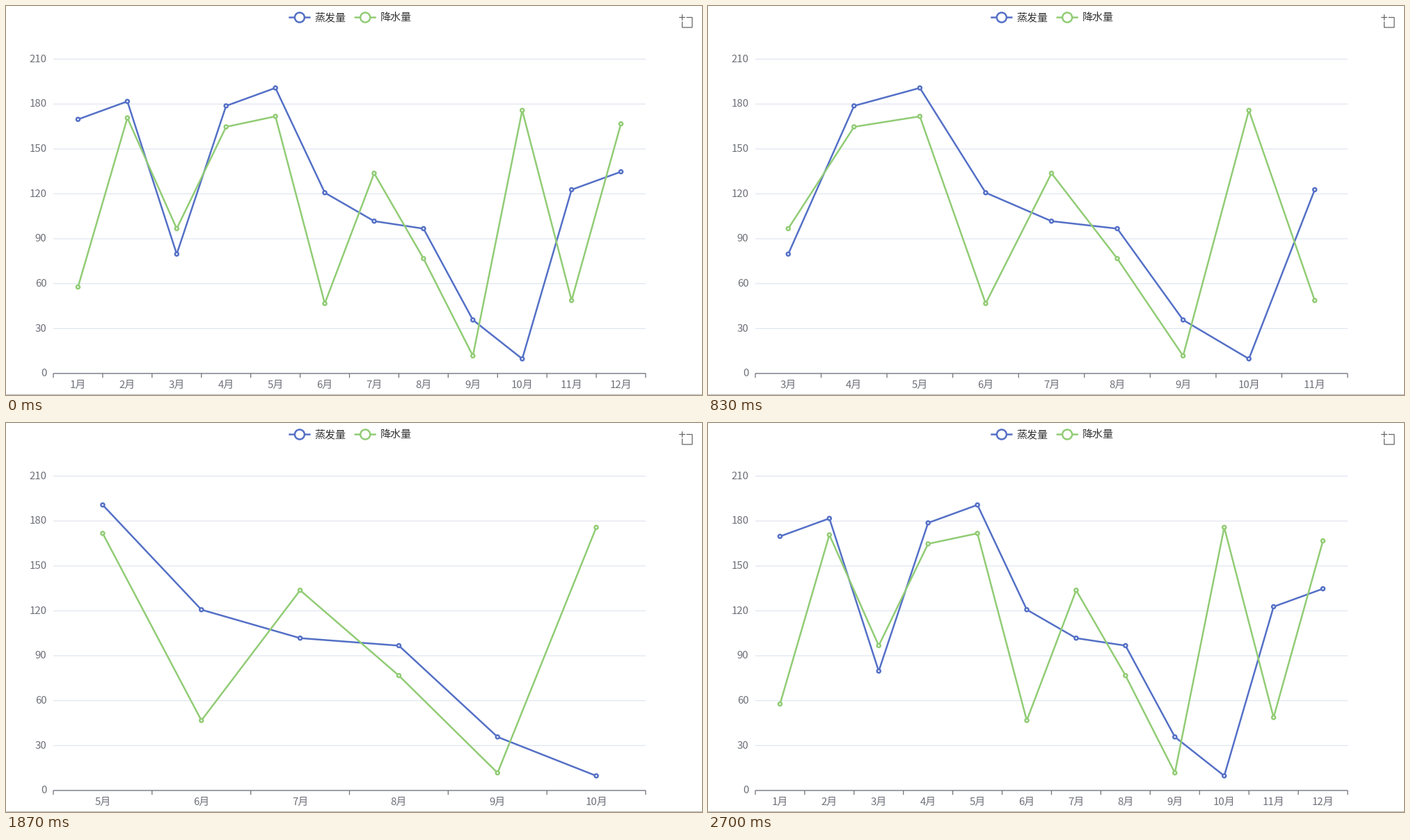
Animation of 1000x560 px, one loop 2950 ms. Source, as a matplotlib script:

```python
import math

import matplotlib.pyplot as plt
from matplotlib.animation import FuncAnimation
from matplotlib.collections import LineCollection, PatchCollection
from matplotlib.patches import Circle, Rectangle

W, H, DPI = 1000, 560, 100
LOOP, INTERVAL = 2950, 25
PX = 72 / DPI                      # points per pixel
LEFT, RIGHT, TOP, BOTTOM = 68, 919, 77, 529.5
HAIR = 0.5                         # grid lines sit half a pixel above values
LEGEND_Y = 16.5
STEP = 30
AXIS, GRID, INK = "#6E7079", "#E0E6F1", "#333333"
FONT = dict(family="Noto Sans CJK JP", size=15 * PX)

SERIES = [
    ("蒸发量", "#5470C6", 406.3,
     [170, 182, 80, 179, 191, 121, 102, 97, 36, 10, 123, 135]),
    ("降水量", "#91CC75", 500.6,
     [58, 171, 97, 165, 172, 47, 134, 77, 12, 176, 49, 167]),
]
MONTHS = 12

# Mouse wheel: NOTCHES in, then the same number out, around the pointer
NOTCHES, ZOOM, POINTER = 12, 1.1, 0.62
IN_START, IN_GAP = 360, 95
OUT_END, OUT_GAP = 2468, 76
GLIDE_MS = 100

# The picture is refreshed every 100 ms, counted anew from these moments
REFRESH_MS, CLOCKS = 100, (0, 150, 580, 850, 1330, 1770, 2200)


def cubic_out(t):
    return 1 - (1 - min(max(t, 0), 1)) ** 3


def lerp(a, b, k):
    return a + (b - a) * k


class View:
    """Pixel coordinates for the months visible after some wheel notches."""

    def __init__(self, notches):
        end = MONTHS - 1
        cut = end * (1 - ZOOM ** -notches)
        self.first = round(cut * POINTER)
        self.last = round(end - cut * (1 - POINTER))
        self.band = (RIGHT - LEFT) / (self.last - self.first + 1)
        peak = max(max(s[3][self.first:self.last + 1]) for s in SERIES)
        self.top = math.ceil(peak / STEP) * STEP

    def has(self, month):
        return self.first <= month <= self.last

    def edge(self, month):
        return LEFT + (month - self.first) * self.band

    def x(self, month):
        return self.edge(month + 0.5)

    def y(self, value):
        return BOTTOM - (BOTTOM - TOP) * value / self.top


VIEWS = [View(n) for n in range(NOTCHES + 1)]


def transition(now):
    """Views before and after the latest wheel notch, and the progress."""
    left = max(math.ceil((OUT_END - now) / OUT_GAP), 0)
    if left < NOTCHES:
        start = OUT_END - left * OUT_GAP
        old = left + 1
    else:
        left = min(max((now - IN_START) // IN_GAP, 0), NOTCHES)
        start = IN_START + left * IN_GAP
        old = max(left - 1, 0)
    return VIEWS[old], VIEWS[left], cubic_out((now - start) / GLIDE_MS)


fig = plt.figure(figsize=(W / DPI, H / DPI), dpi=DPI, facecolor="white")
ax = fig.add_axes([0, 0, 1, 1])
ax.set_xlim(0, W)
ax.set_ylim(H, 0)
ax.axis("off")


def stroke(xs, ys, color, width, z=2, **kw):
    return ax.plot(xs, ys, color=color, lw=width * PX, zorder=z,
                   solid_capstyle="butt", **kw)[0]


def ring_style(color, z):
    return dict(facecolor="white", edgecolor=color, linewidth=2.5 * PX,
                zorder=z)


def segments(color, z):
    lines = LineCollection([], colors=color, linewidths=1.25 * PX, zorder=z)
    lines.set_snap(False)
    return ax.add_collection(lines, autolim=False)


def label(x, y, text, color, align):
    return ax.text(x, y, text, color=color, ha=align, va="baseline",
                   zorder=6, **FONT)


# Window border, legend and toolbox icon
stroke([999.5, 999.5], [0, H], "#C8C8C8", 1)
stroke([0, W], [559.3, 559.3], "#C0C0C0", 1.4)
for name, color, x, _ in SERIES:
    stroke([x, x + 31.25], [LEGEND_Y, LEGEND_Y], color, 2.5, snap=False)
    ax.add_patch(Circle((x + 15.6, LEGEND_Y), 7, **ring_style(color, 3)))
    label(x + 37, LEGEND_Y + 4.8, name, INK, "left")

UNIT = 18.75 / 58
for path in ([(0, 13.5), (26.9, 13.5)], [(13.5, 0), (13.5, 26.9)],
             [(32.1, 13.5), (58, 13.5), (58, 58), (13.5, 58), (13.5, 32.1)]):
    stroke([967.2 + UNIT * px for px, _ in path],
           [12.1 + UNIT * py for _, py in path], "#666666", 1.25,
           snap=False, solid_joinstyle="miter")

# Axes and series
stroke([LEFT, RIGHT], [BOTTOM - HAIR] * 2, AXIS, 1.25, z=1.5, snap=False)
grid = segments(GRID, 1)
ticks = segments(AXIS, 1.5)
months = [label(0, 550.3, f"{m + 1}月", AXIS, "center")
          for m in range(MONTHS)]
levels = [label(58.5, 0, str(v), AXIS, "right")
          for v in range(0, VIEWS[0].top + 1, STEP)]

curves, dots = [], []
for i, (_, color, _, _) in enumerate(SERIES):
    curve = stroke([], [], color, 2.5, z=3 + i, solid_joinstyle="bevel")
    curve.set_clip_path(Rectangle((LEFT - 2, 0), RIGHT - LEFT + 4, H,
                                  transform=ax.transData))
    curves.append(curve)
    dots.append(ax.add_collection(
        PatchCollection([], **ring_style(color, 3.5 + i)), autolim=False))


def draw(frame):
    time = (frame + 1) * INTERVAL - 1
    clock = max(c for c in CLOCKS if c <= time)
    old, new, k = transition(time - (time - clock) % REFRESH_MS)
    shown = range(new.first, new.last + 1)
    # Newcomers stand at their final place at once; the rest glide there.
    pace = {m: k if old.has(m) else 1 for m in shown}

    tick_xs = [lerp(old.edge(m), new.edge(m), pace[m]) for m in shown]
    ticks.set_segments([[(x, BOTTOM - HAIR), (x, BOTTOM - HAIR + 6.25)]
                        for x in tick_xs + [RIGHT]])
    for m, text in enumerate(months):
        text.set_visible(m in pace)
        if m in pace:
            text.set_x(lerp(old.x(m), new.x(m), pace[m]))

    rows = []
    for i, text in enumerate(levels):
        value = i * STEP
        text.set_visible(value <= new.top)
        if value <= new.top:
            y = lerp(old.y(value), new.y(value),
                     k if value <= old.top else 1) - HAIR
            text.set_y(y + 4.3)
            rows.append([(LEFT, y), (RIGHT, y)])
    grid.set_segments(rows)

    for (_, _, _, data), curve, dot in zip(SERIES, curves, dots):
        def place(m, progress):
            return (lerp(old.x(m), new.x(m), progress),
                    lerp(old.y(data[m]), new.y(data[m]), progress))

        curve.set_data(*zip(*(place(m, k) for m in shown)))
        dot.set_paths([Circle(place(m, pace[m]), 2.5) for m in shown])
    return curves + dots


anim = FuncAnimation(fig, draw, frames=LOOP // INTERVAL, interval=INTERVAL,
                     init_func=lambda: draw(0), repeat=True, repeat_delay=0)
plt.show()
```
